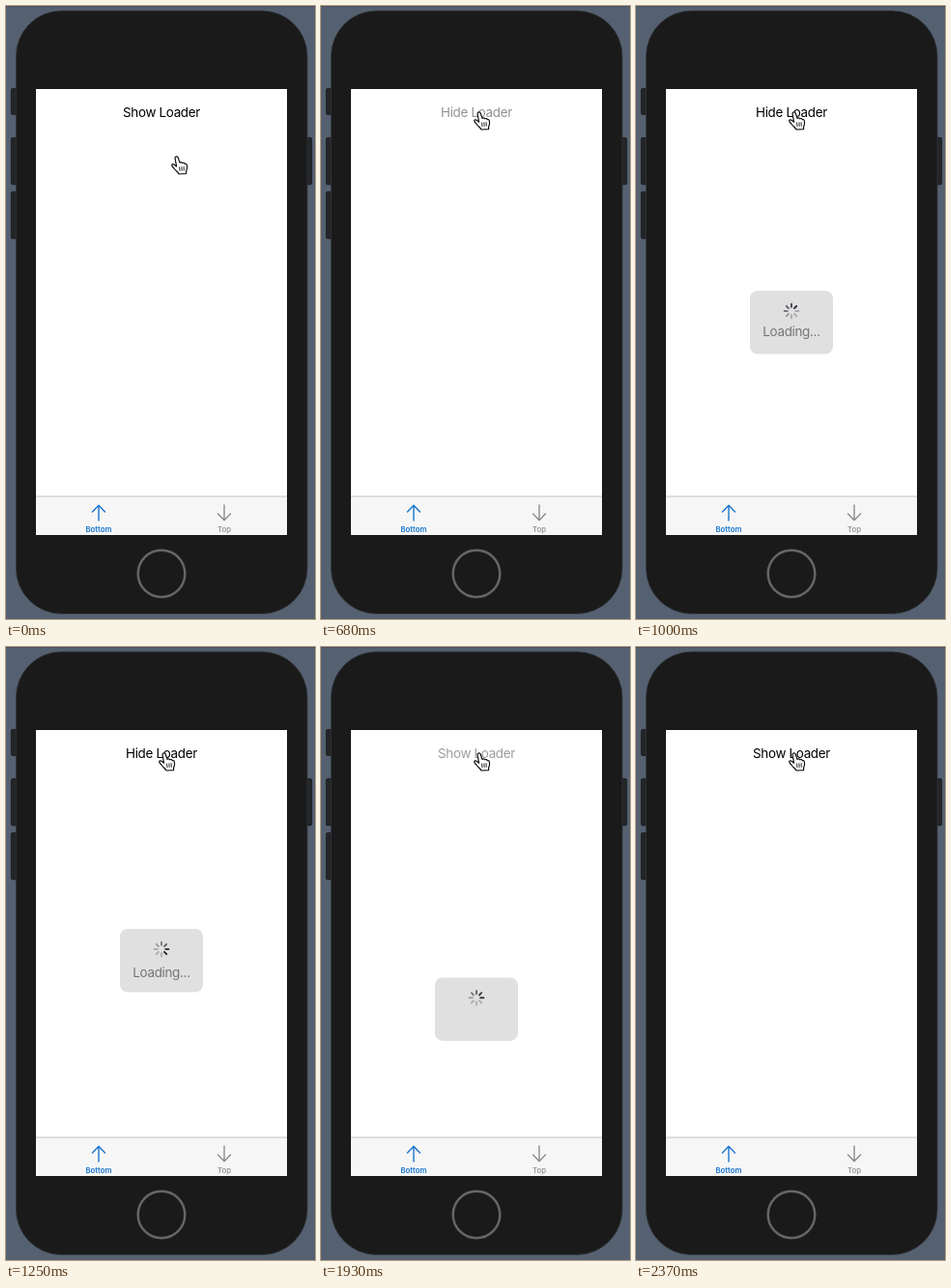
An HTML page that plays this animation: 320 px wide and 635 px high, repeating every 3070 ms.

```html
<!DOCTYPE html>
<html lang="en">
<head>
<meta charset="utf-8">
<title>Loader demo</title>
<style>
  html, body { margin: 0; width: 100%; height: 100%; overflow: hidden; background: #556171; }
  svg { display: block; width: 100%; height: 100%; }
  text { font-family: Inter, Roboto, sans-serif; text-anchor: middle; }
  .big { font-size: 13.4px; letter-spacing: -.3px; }
  .tab { font-size: 7.8px; }
  .arrow { fill: none; stroke-width: 1.4; stroke-linecap: round; stroke-linejoin: round; }
</style>
</head>
<body>
<svg viewBox="0 0 320 635">
  <defs>
    <clipPath id="screen"><rect x="31" y="86" width="260" height="462"/></clipPath>
  </defs>
  <rect width="320" height="635" fill="#556171"/>
  <rect width="320" height="1" fill="#47515e"/>

  <g fill="#242527" stroke="#17181a" stroke-width=".8">
    <rect x="5.4" y="85.4" width="8" height="27" rx="1.5"/>
    <rect x="5.4" y="136.4" width="8" height="48.5" rx="1.5"/>
    <rect x="5.4" y="192.4" width="8" height="48.5" rx="1.5"/>
    <rect x="309" y="136.4" width="7.6" height="48.5" rx="1.5"/>
  </g>
  <rect x="10.5" y="5" width="301.5" height="624.5" rx="47" fill="#1a1a1a" stroke="#303338" stroke-width=".8"/>
  <circle cx="161" cy="588" r="24.3" fill="none" stroke="#666" stroke-width="2.5"/>

  <g clip-path="url(#screen)">
    <rect x="31" y="86" width="260" height="462" fill="#fff"/>
    <text id="button" class="big" x="161" y="115"></text>

    <rect x="31" y="508" width="260" height="40" fill="#f6f6f6"/>
    <rect x="31" y="507.5" width="260" height="1" fill="#c4c4c4"/>
    <path class="arrow" stroke="#1976d0" d="M96 533V517.5M89.5 524L96 517.3L102.5 524"/>
    <path class="arrow" stroke="#8c8c8c" d="M226 517V532.5M219.5 526L226 532.7L232.5 526"/>
    <text class="tab" x="96" y="544.8" font-weight="600" fill="#1976d0">Bottom</text>
    <text class="tab" x="226" y="544.8" font-weight="500" fill="#8c8c8c">Top</text>

    <g id="loader">
      <rect x="118" width="86" height="65.5" rx="8" fill="#e0e0e0"/>
      <g id="spinner" transform="translate(161 21)" stroke-width="1.8" stroke-linecap="round"></g>
    </g>
    <text id="label" class="big" x="161" y="341.5" fill="#747579">Loading...</text>
  </g>

  <g id="hand" fill="#fff" stroke="#111" stroke-width="1.2" stroke-linejoin="round" stroke-linecap="round">
    <path d="M4 2.4C4 .6 6.6 .3 7.2 2L9 7.4C10 6.6 11.4 6.8 11.8 7.8C13 7.2 14 7.6 14.3 8.6C15.5 8.3 16.2 9 16.4 10C17 13 16.4 14 15.6 16V18.6L8 19C7 16.5 4.5 15.5 3.2 13.5C2 11.8 .6 11 .7 9.8C1 8.4 3 8.8 4 10L5.6 11.2Z"/>
    <path d="M8.6 12L9 15.6M10.9 11.8L11.2 15.4M13.1 11.6L13.3 15.2" stroke-width=".9"/>
  </g>
</svg>
<script>
const LOOP = 3070, REST = 292, TRAVEL = 462, SLIDE = 423, FADE = 250;
const SHOW = 656, PRESS = 1790, HIDE = 1914, DIM = 0.3;

const TICKS = [0, 50, 250, 300, 370, 420, 680, 750, 800, 870, 930, 1000, 1050, 1120, 1200,
  1250, 1300, 1370, 1430, 1500, 1550, 1620, 1680, 1750,
  1800, 1870, 1930, 2000, 2050, 2120, 2180, 2250, 2370];
const HAND = [[0, 171, 155], [50, 170.5, 141.5], [250, 168, 130], [300, 164, 119], [370, 160, 111.5], [420, 158, 109]];

const $ = id => document.getElementById(id);
const progress = (t, start, span) => Math.min(1, Math.max(0, (t - start) / span));
const easeOut = (x, power) => 1 - (1 - x) ** power;
const lastBefore = (list, test) => list.filter(test).pop();

const spokes = Array.from({ length: 8 }, (_, i) => {
  const spoke = document.createElementNS("http://www.w3.org/2000/svg", "path");
  spoke.setAttribute("d", "M0 -4.2V-7.4");
  spoke.setAttribute("transform", `rotate(${i * 45})`);
  return $("spinner").appendChild(spoke);
});

function loaderOffset(t) {
  return t < HIDE
    ? TRAVEL * (1 - easeOut(progress(t, SHOW, SLIDE), 3))
    : TRAVEL * easeOut(progress(t, HIDE, SLIDE), 3);
}

function buttonOpacity(t) {
  if (t < SHOW) return 1;
  if (t >= PRESS && t < HIDE) return 1 - (1 - DIM) * progress(t, PRESS, HIDE - PRESS);
  const start = t < HIDE ? SHOW : HIDE;
  return DIM + (1 - DIM) * easeOut(progress(t, start, FADE), 2);
}

function draw(t) {
  const [, x, y] = lastBefore(HAND, p => p[0] <= t);
  $("hand").setAttribute("transform", `translate(${x} ${y})`);

  $("button").textContent = t >= SHOW && t < HIDE ? "Hide Loader" : "Show Loader";
  $("button").setAttribute("opacity", buttonOpacity(t));

  const offset = loaderOffset(t);
  $("loader").setAttribute("transform", `translate(0 ${REST + offset})`);
  $("label").setAttribute("visibility", offset < 30 ? "visible" : "hidden");

  const head = Math.floor(t / 100) + 7;
  spokes.forEach((spoke, i) => {
    const age = (head - i + 8) % 8;
    const shade = Math.min(168, 30 + age * 30);
    spoke.setAttribute("stroke", `rgb(${shade},${shade + 3},${shade + 8})`);
  });
}

function frame(now) {
  const t = now % LOOP;
  draw(lastBefore(TICKS, tick => tick <= t) ?? 0);
  requestAnimationFrame(frame);
}
draw(0);
requestAnimationFrame(frame);
</script>
</body>
</html>
```
